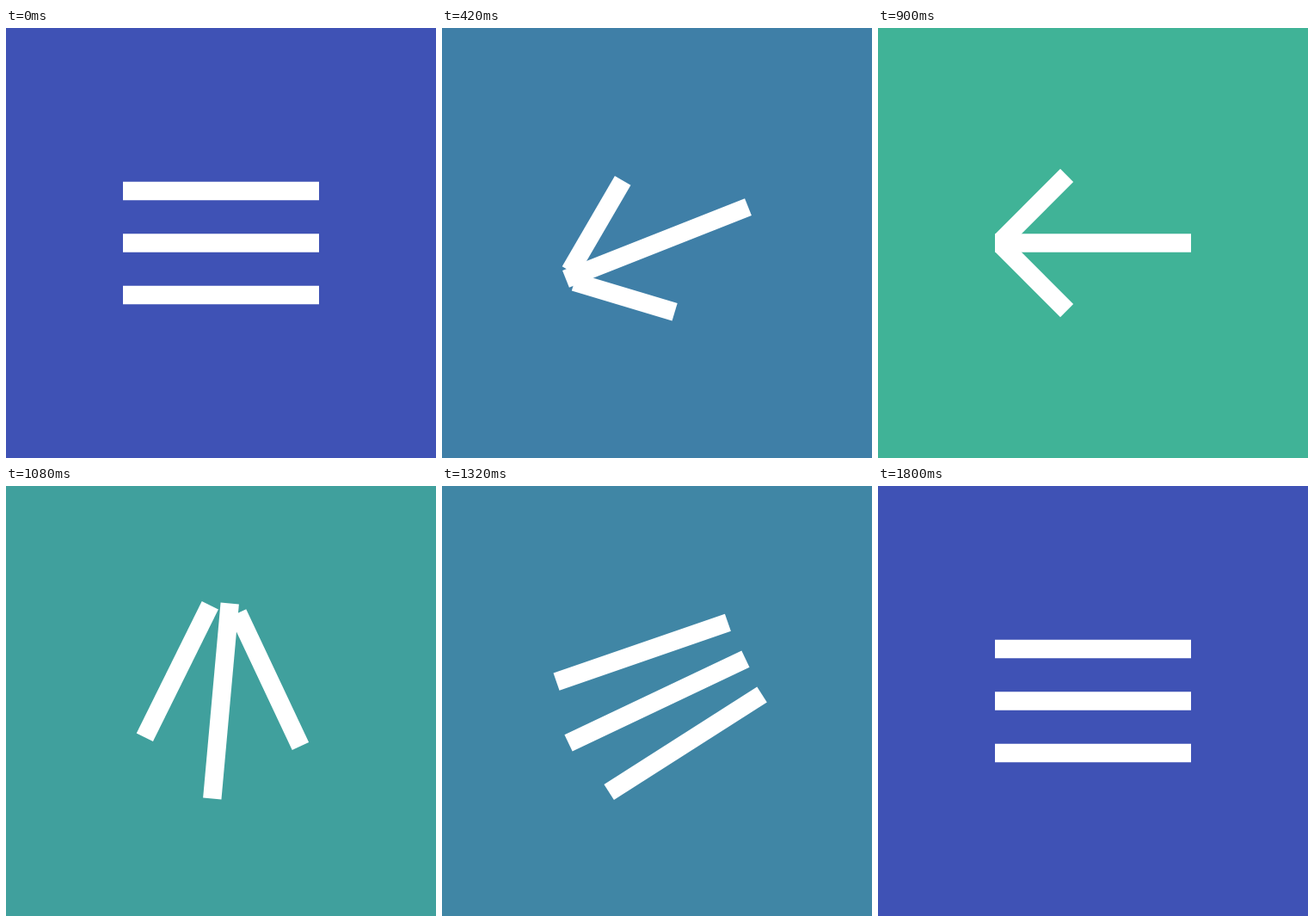
An HTML page for the animation above (1.83 s loop, 500 by 500 pixels).

```html
<!DOCTYPE html>
<html lang="en">
<head>
<meta charset="utf-8">
<title>Menu and back arrow</title>
<style>
  html, body { margin: 0; height: 100%; overflow: hidden; background: #3f51b5; }
  svg { display: block; width: 100%; height: 100%; }
</style>
</head>
<body>
<svg viewBox="-250 -250 500 500">
  <g id="icon" stroke="#fff" stroke-width="21.4">
    <line id="top"/>
    <line x1="-114" x2="114"/>
    <line id="bottom"/>
  </g>
</svg>
<script>
const STEP = 30, HALF = 900, LOOP = 1830;
const MENU = [63, 82, 181], ARROW = [64, 179, 151];
const [icon, topBar, bottomBar] = ['icon', 'top', 'bottom'].map(id => document.getElementById(id));
const lerp = (a, b, p) => a + (b - a) * p;

// Cubic Bezier easing whose second handle lies at y = 1
function ease(x1, y1, x2) {
  const curve = (a, b, t) => 3 * a * t * (1 - t) ** 2 + 3 * b * t * t * (1 - t) + t ** 3;
  return x => {
    if (x <= 0 || x >= 1) return x <= 0 ? 0 : 1;
    let lo = 0, hi = 1;
    for (let i = 0; i < 30; i++) {
      const mid = (lo + hi) / 2;
      if (curve(x1, x2, mid) < x) lo = mid; else hi = mid;
    }
    return curve(y1, 1, lo);
  };
}

const quick = ease(.167, .167, 0), smooth = ease(.167, 0, 0);
const forward = { spin: quick, size: quick, shift: ease(.167, 0, .03), tiltTop: ease(.167, 0, .03), tiltBottom: ease(.167, 0, .03) };
const back = { spin: smooth, size: smooth, shift: ease(.167, .1, 0), tiltTop: smooth, tiltBottom: ease(.33, 0, 0) };

function setBar(bar, x, y, length, angle) {
  bar.setAttribute('x1', -length / 2);
  bar.setAttribute('x2', length / 2);
  bar.setAttribute('transform', `translate(${x} ${y}) rotate(${angle})`);
}

function draw(time) {
  const returning = time >= HALF;
  const x = Math.min(1, (time - (returning ? HALF : 0)) / HALF);
  const easing = returning ? back : forward;
  // 0 is the menu, 1 is the arrow
  const morph = name => returning ? 1 - easing[name](x) : easing[name](x);

  const shift = morph('shift'), length = lerp(228, 107.4, morph('size'));
  const cx = 68.4 * shift, cy = 60.5 - 19.9 * shift * (.65 + .35 * shift);
  setBar(topBar, cx, -cy, length, 45 * morph('tiltTop'));
  setBar(bottomBar, cx, cy, length, -45 * morph('tiltBottom'));
  icon.setAttribute('transform', `rotate(${180 * (returning + easing.spin(x))})`);

  const tint = returning ? 1 - x : x;
  document.body.style.background = `rgb(${MENU.map((c, i) => Math.round(lerp(c, ARROW[i], tint)))})`;
}

const start = performance.now();
function tick() {
  const time = (performance.now() - start) % LOOP;
  draw(Math.floor((time + 3) / STEP) * STEP % LOOP);
  requestAnimationFrame(tick);
}
tick();
</script>
</body>
</html>
```
